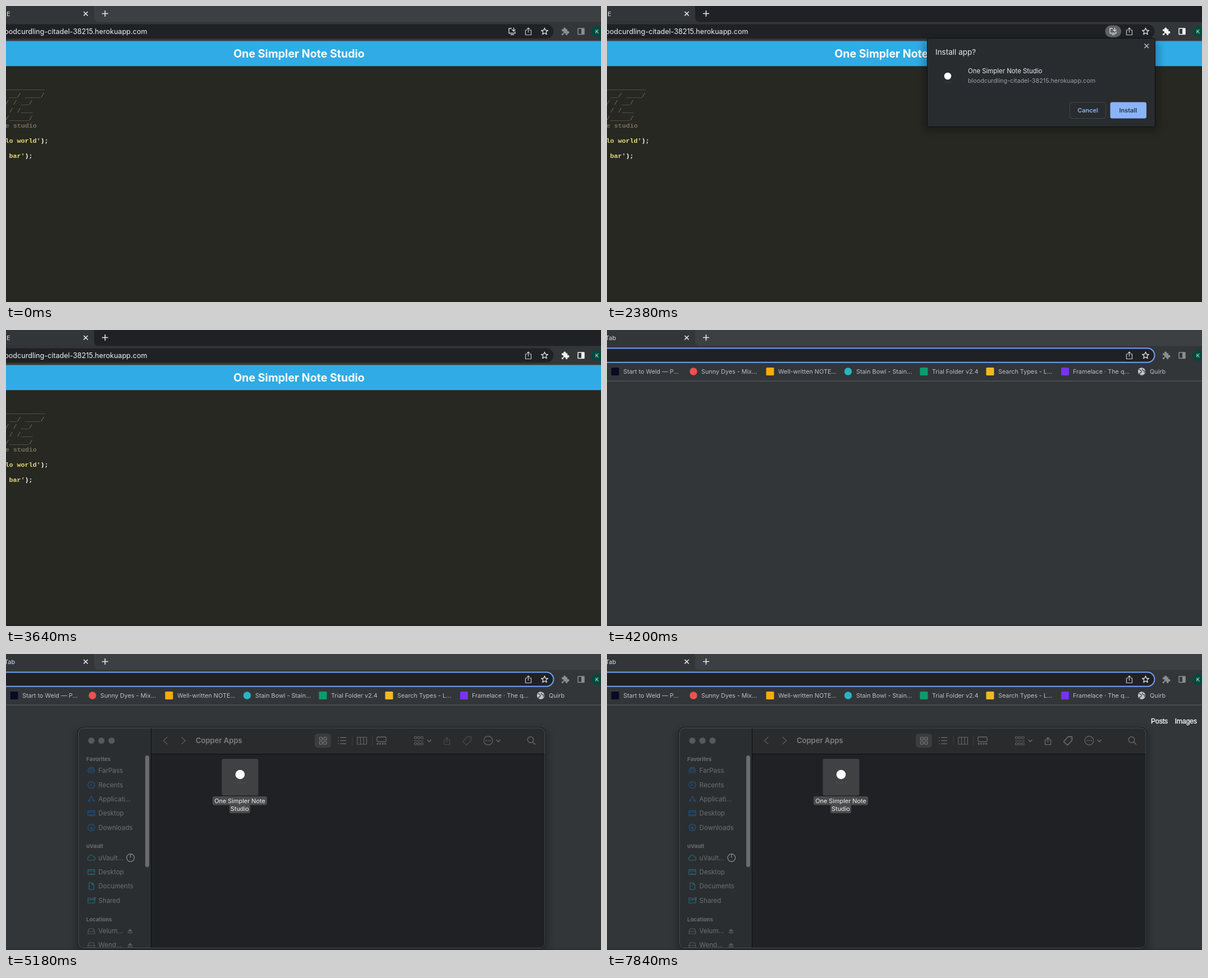
An HTML page that plays this animation: 1060x528 px, repeating every 8.26 s.

```html
<!DOCTYPE html>
<html lang="en">
<head>
<meta charset="utf-8">
<title>Installing a web app</title>
<style>
  html, body { margin: 0; width: 100%; height: 100%; overflow: hidden; background: #272822; }
  svg { display: block; width: 100vw; height: 100vh; }
  text { font-family: Inter, Roboto, sans-serif; white-space: pre; }
  .mono { font-family: "Liberation Mono", "DejaVu Sans Mono", monospace; }
  .arial { font-family: "Liberation Sans", sans-serif; stroke: #fff; stroke-width: .3; }
</style>
</head>
<body>
<svg id="stage" viewBox="0 0 1060 528" preserveAspectRatio="none"></svg>
<script>
const LOOP = 8260, STEP = 70;
const APP = 'One Simpler Note Studio';
const HOST = 'bloodcurdling-citadel-38215.herokuapp.com';

const rect = (x, y, w, h, fill, r = 0, extra = '') =>
  `<rect x="${x}" y="${y}" width="${w}" height="${h}" rx="${r}" fill="${fill}" ${extra}/>`;
const disc = (x, y, r, fill, extra = '') =>
  `<circle cx="${x}" cy="${y}" r="${r}" fill="${fill}" ${extra}/>`;
const line = (d, color, w = 1.2, extra = '') =>
  `<path d="${d}" fill="none" stroke="${color}" stroke-width="${w}" ${extra}/>`;
const text = (x, y, s, size, fill, extra = '') =>
  `<text x="${x}" y="${y}" font-size="${size}" fill="${fill}" ${extra}>${s}</text>`;
const group = (id, body) => `<g id="${id}">${body}</g>`;
const END = 'text-anchor="end"', MID = 'text-anchor="middle"';

function shareIcon(x, y, color) {
  return line(`M${x - 2} ${y - 2.5}h-3v8.5h10v-8.5h-3M${x} ${y + 2}v-8M${x - 2.5} ${y - 4}l2.5 -2.5l2.5 2.5`, color);
}

function starIcon(x, y, color) {
  let d = '';
  for (let i = 0; i < 10; i++) {
    const a = -Math.PI / 2 + i * Math.PI / 5, r = i % 2 ? 2.8 : 6.3;
    d += `${i ? 'L' : 'M'}${(x + r * Math.cos(a)).toFixed(2)} ${(y + r * Math.sin(a)).toFixed(2)}`;
  }
  return line(d + 'Z', color, 1.3, 'stroke-linejoin="round"');
}

function frameTop() {
  return rect(0, 0, 1060, 29, '#3c4043', 0, 'id="strip"') +
    '<path d="M0 0H157V20Q157 28.5 165 28.5H0Z" fill="#323639"/>' +
    rect(0, 28.5, 1060, 34, '#323639') +
    line('M138.3 10l7.4 7.4m0 -7.4l-7.4 7.4', '#e8eaed', 1.5) +
    line('M171 13.5h11M176.5 8v11', '#e8eaed', 1.6) +
    rect(-40, 32.5, 1015.5, 25.5, '#202124', 12.75) +
    shareIcon(930.5, 45.5, '#c4c7cb') + starIcon(959.5, 45.5, '#dfe1e5') +
    group('tools',
      '<path d="M990 41.5h3a2.3 2.3 0 1 1 4.4 0h2.8v3.4a2.3 2.3 0 1 1 0 4.2v2.9h-3.2a2.2 2.2 0 1 0 -3.8 0h-3.2v-3.2a2.2 2.2 0 1 0 0 -3.9z" fill="currentColor"/>' +
      rect(1019, 40, 11, 10.5, 'none', 0.5, 'stroke="currentColor" stroke-width="1.5"') +
      rect(1025, 40, 5, 10.5, 'currentColor')) +
    disc(1053, 45.3, 10, '#00493c') + text(1053, 48.8, 'K', 9.5, '#e8f0ee', MID);
}

function editor() {
  const code = (x, y, s, fill, weight = 700) =>
    text(x, y, s, 11.7, fill, `class="mono" font-weight="${weight}" ${END}`);
  const art = [['____________', 69], ['__/ ____/', 68.5], ['/ / __/', 47.5], ['/ / /___', 47.5], ['/ /_____/', 47.5]];
  const row = n => 149.3 + n * 13.57;
  const call = (n, x, s) => code(x - 14, row(n), s, '#e6db74') + code(x, row(n), ');', '#f8f8f2');
  return text(7.5, 17.5, '.E', 11, '#dfe1e5', END) +
    text(251.5, 49.8, HOST, 12.6, '#f1f3f4', END) +
    rect(0, 61.5, 1060, 1, '#4a4d50') + rect(0, 62.5, 1060, 45, '#30abe5') +
    text(522, 92.3, APP, 19.6, '#fff', `font-weight="700" ${MID}`) +
    rect(0, 107.5, 1060, 421, '#272822') + rect(0, 525, 1060, 3, '#24251f') +
    art.map(([s, x], i) => code(x, row(i), s, '#75715e', 400)).join('') +
    code(54.8, row(5), 'e studio', '#75715e') +
    call(7, 75.5, "lo world'") + call(9, 47.5, "bar'") +
    rect(47, 260.5, 1, 13.5, '#f8f8f0', 0, 'id="caret"') +
    group('getApp',
      rect(887.5, 34.5, 28.5, 21.5, '#5f6165', 10.75, 'id="pill"') +
      line('M901 40h-5v8.5h11v-3M899 51h6', '#d0d3d6', 1.4) +
      line('M904.5 38.5v6M901.5 42l3 3l3 -3', '#d0d3d6', 1.4));
}

function dialog() {
  return group('dialog',
    rect(562, 60, 422, 165, '#000', 12, 'opacity=".22" filter="url(#blur)"') +
    rect(570.5, 57.5, 406, 158, '#292c2f', 4, 'stroke="#0c0d0e"') +
    line('M957.5 67.5l7.5 7.5m0 -7.5l-7.5 7.5', '#bdc1c6', 1.5) +
    text(585, 87, 'Install app?', 13.5, '#e8eaed') +
    disc(607, 125, 6.3, '#fff') + text(607, 137.5, 'o n e', 5, '#484b4e', MID) +
    text(643, 120.2, APP, 11.4, '#e8eaed') +
    text(643, 137.2, HOST, 10.8, '#9aa0a6') +
    rect(824.5, 172, 64, 28.5, 'none', 3.5, 'stroke="#44474b"') +
    text(856.5, 190, 'Cancel', 10.9, '#8ab4f8', `font-weight="600" ${MID}`) +
    rect(896.5, 171.5, 64.5, 29, '#8ab4f8', 3.5, 'id="install"') +
    text(928.3, 190, 'Install', 10.9, '#26303f', `font-weight="600" ${MID}`));
}

function newTab() {
  const sq = (x, c) => rect(x - 7, 67, 14, 14, c, 1.5);
  const dot = (x, c) => disc(x, 74, 6.7, c);
  const marks = [
    [sq, 14.5, '#0a0a23', 29, 'Start to Weld — P...'],
    [dot, 154, '#f0504f', 168, 'Sunny Dyes - Mix...'],
    [sq, 290.5, '#f9ab0b', 305, 'Well-written NOTE...'],
    [dot, 429.5, '#2bb3c0', 444, 'Stain Bowl - Stain...'],
    [sq, 564.5, '#0d9c6b', 579, 'Trial Folder v2.4'],
    [sq, 682.5, '#f4b824', 697, 'Search Types - L...'],
    [sq, 816, '#7633f2', 830, 'Framelace · The q...'],
    [dot, 952.5, '#c4c7cb', 967, 'Quirb'],
  ];
  return text(16, 17.5, 'New Tab', 10.8, '#dfe1e5', END) +
    rect(0, 62, 1060, 466, '#323639') + rect(0, 90.5, 1060, 1, '#606468') +
    rect(-40, 32.5, 1015.5, 25.5, '#202124', 12.75) +
    shareIcon(930.5, 45.5, '#c4c7cb') + starIcon(959.5, 45.5, '#dfe1e5') +
    rect(-40, 32.5, 1015.5, 25.2, 'none', 12.6, 'stroke="#70a2f6" stroke-width="2"') +
    marks.map(([icon, x, c, tx, s]) => icon(x, c) + text(tx, 78, s, 10.8, '#bdc1c6')).join('') +
    line('M948 70.5q3 1 4 3t-2 3t0 3M954 69q-1 3 2 3.5t1 4', '#4a4d50', 1.5) +
    rect(0, 525, 1060, 3, '#2d3134') +
    group('links',
      text(999, 123.5, 'Posts', 12, '#fff', `class="arial" ${END}`) +
      text(1051, 123.5, 'Images', 12, '#fff', `class="arial" ${END}`));
}

function sidebar() {
  const blue = '#1f568a', teal = '#2a6a7c', grey = '#57595b';
  const shapes = {
    waves: 'M-3.5 5a6 6 0 1 1 7 0M-2 2.5a3.3 3.3 0 1 1 4 0M0 0v5',
    clock: 'M-6 0a6 6 0 1 0 12 0a6 6 0 1 0 -12 0M0 -3.5v4h-2.5',
    apps: 'M0 -5.5l-5 10.5M0 -5.5l5 10.5M-6.5 2h4.5M1 2h5.5',
    desk: 'M-6 -4.5h12v9h-12zM-6 -2h12M-4 2.8h8',
    down: 'M-6 0a6 6 0 1 0 12 0a6 6 0 1 0 -12 0M0 -3.5v6.5M-2.5 .5l2.5 2.5l2.5 -2.5',
    cloud: 'M-4 4.5a2.8 2.8 0 0 1 -.5 -5.5a4.3 4.3 0 0 1 8.3 -1a3.3 3.3 0 0 1 .2 6.5z',
    doc: 'M-4 -6h5l3.5 3.5v8.5h-8.5zM1 -6v3.5h3.5',
    folder: 'M-6 4.5v-9h4l1.5 1.5h6.5v7.5zM-6 -1h12M3 -5h4v4',
    drive: 'M-6 1l2 -5h8l2 5v4h-12zM-6 1h12',
  };
  const items = [
    ['waves', 208, 'FarPass', blue], ['clock', 233.5, 'Recents', blue], ['apps', 259, 'Applicati...', blue],
    ['desk', 284, 'Desktop', blue], ['down', 309.5, 'Downloads', blue],
    ['cloud', 363.5, 'uVault...', teal], ['desk', 389, 'Desktop', teal], ['doc', 414, 'Documents', teal],
    ['folder', 439.5, 'Shared', teal], ['drive', 494, 'Velum...', grey], ['drive', 519, 'Wend...', grey],
  ];
  const heads = [[187, 'Favorites'], [342.5, 'uVault'], [473, 'Locations']];
  const eject = y => `<path d="M216.5 ${y + 1}l4.5 -5l4.5 5zM216.5 ${y + 2.5}h9v1.5h-9z" fill="#57595b"/>`;
  return heads.map(([y, s]) => text(143, y + 3.7, s, 9.6, '#6a6c6e', 'font-weight="700"')).join('') +
    items.map(([k, y, s, c]) =>
      line(shapes[k], c, 1.1, `transform="translate(152 ${y})"`) + text(164.6, y + 4.4, s, 11.6, '#6e7072')).join('') +
    line('M215 363.5a6.8 6.8 0 1 0 13.6 0a6.8 6.8 0 1 0 -13.6 0M221.8 363.5v-6.8', '#8d8f91', 1.2) +
    eject(494) + eject(519) + rect(248, 181, 7, 199, '#6b6c6e', 3.5);
}

function toolbar() {
  const c = '#66686a';
  let s = text(338, 159.2, 'Copper Apps', 13, '#7e8082', 'font-weight="600"') +
    line('M287.5 148l-7 6.5l7 6.5M312.5 148l7 6.5l-7 6.5', '#56585a', 1.5) +
    rect(550, 142, 29, 25, '#3a3c3e', 5);
  for (const x of [152, 170, 188]) s += disc(x, 154.5, 5.6, '#58595b');
  for (const x of [558.5, 566]) for (const y of [148.5, 156])
    s += rect(x, y, 5, 5, 'none', 1, 'stroke="#7a7c7f" stroke-width="1.2"');
  for (const y of [149, 154.5, 160]) s += line(`M591 ${y}h1.8M595.5 ${y}h10.5`, c, 1.4);
  for (const x of [616.5, 652.5]) s += rect(x, 146, 1, 17, '#3d3f41');
  s += line('M626 148.5h16.5v12.5h-16.5zM631.5 148.5v12.5M637 148.5v12.5', c) +
    rect(661, 148, 16, 8.5, 'none', 1.5, `stroke="${c}" stroke-width="1.3"`);
  for (let i = 0; i < 4; i++) s += rect(660.5 + i * 4.6, 159, 3, 2.5, c);
  for (const y of [147.5, 158.5]) for (let i = 0; i < 3; i++)
    s += rect(727.5 + i * 5.8, y, 4, 3.5, 'none', 0.5, `stroke="${c}"`);
  s += line('M727 155h17', c, 1) +
    line('M750.5 153l3.5 3.5l3.5 -3.5M873.5 153l3.5 3.5l3.5 -3.5', c, 1.5) +
    group('actions', shareIcon(785.5, 155.5, 'currentColor') +
      line('M813.5 156.5l8 -9h7v6.5l-8 8.5zM825.5 150.5h.8', 'currentColor', 1.3, 'stroke-linejoin="round"')) +
    disc(859, 154.5, 7.8, 'none', `stroke="${c}" stroke-width="1.2"`);
  for (const x of [855.5, 859, 862.5]) s += disc(x, 154.5, 1.1, c);
  return s + disc(934.5, 153, 5.3, 'none', `stroke="${c}" stroke-width="1.4"`) + line('M938.5 157l4.5 4.5', c, 1.6);
}

function finder() {
  const words = APP.split(' ');
  const last = words.pop();
  return group('finder',
    rect(122, 134, 845, 400, '#000', 14, 'opacity=".2" filter="url(#blur)"') +
    rect(127.5, 130.5, 834, 395, '#111214', 10) +
    rect(128.5, 131.5, 832, 393, '#202125', 9) +
    '<path d="M258 131.5H951Q960.5 131.5 960.5 141V178H258Z" fill="#292b2d"/>' +
    '<path d="M258 131.5H138Q128.5 131.5 128.5 141V515Q128.5 524.5 138 524.5H258Z" fill="#2b2e30"/>' +
    rect(258, 178, 702, 1, '#0c0d0e') + rect(258, 132, 1, 392.5, '#0c0d0e') +
    '<g clip-path="url(#side)">' + sidebar() + '</g>' + toolbar() +
    rect(129, 132, 831, 392.5, 'none', 9, 'stroke="#505254"') +
    rect(384.5, 187, 65, 65.5, '#404143', 3) +
    disc(417, 215, 8.3, '#fff') + text(417, 232, 'o n e s', 6, '#505254', MID) +
    rect(368, 254, 97, 15.5, '#4a4b4d', 3) + rect(398, 268.5, 37, 15.5, '#4a4b4d', 3) +
    text(416.5, 266, words.join(' '), 10.9, '#f0f0f0', MID) +
    text(416.5, 280.3, last, 10.9, '#f0f0f0', MID));
}

document.getElementById('stage').innerHTML =
  '<defs><filter id="blur" x="-10%" y="-20%" width="120%" height="140%"><feGaussianBlur stdDeviation="6"/></filter>' +
  '<clipPath id="side"><rect x="129" y="132" width="129" height="392"/></clipPath></defs>' +
  frameTop() + group('editor', editor() + dialog()) + group('newTab', newTab() + finder());

const el = {};
document.querySelectorAll('[id]').forEach(n => { el[n.id] = n; });
const show = (id, on) => { el[id].style.display = on ? '' : 'none'; };
const ramp = (t, from, to) => Math.max(0, Math.min(1, (t - from) / (to - from)));
const mix = (a, b, k) => `rgb(${a.map((v, i) => Math.round(v + (b[i] - v) * k))})`;

function draw(ms) {
  const t = Math.floor(ms / STEP) * STEP;
  const tab = t >= 4200, focused = t >= 1400 && !tab;
  show('editor', !tab);
  show('newTab', tab);
  el.strip.setAttribute('fill', focused ? '#202124' : '#3c4043');
  el.tools.style.color = focused ? '#f1f3f4' : '#8b8e91';

  show('caret', (t >= 1400 && t < 1960) || (t >= 3500 && t < 3640));
  show('getApp', t < 3430);
  el.pill.style.opacity = ramp(t, 1330, 1610);

  show('dialog', t >= 1960 && t < 3430);
  el.dialog.style.opacity = 1 - ramp(t, 3290, 3430);
  el.install.setAttribute('fill', mix([138, 180, 248], [122, 151, 203], ramp(t, 2800, 3080)));

  show('finder', t >= 5110);
  el.finder.style.opacity = ramp(t, 5040, 5180);
  el.actions.style.color = t >= 5460 ? '#747678' : '#47494b';
  show('links', t >= 6510);
}

const start = performance.now();
function tick() {
  draw((performance.now() - start) % LOOP);
  requestAnimationFrame(tick);
}
tick();
</script>
</body>
</html>
```
